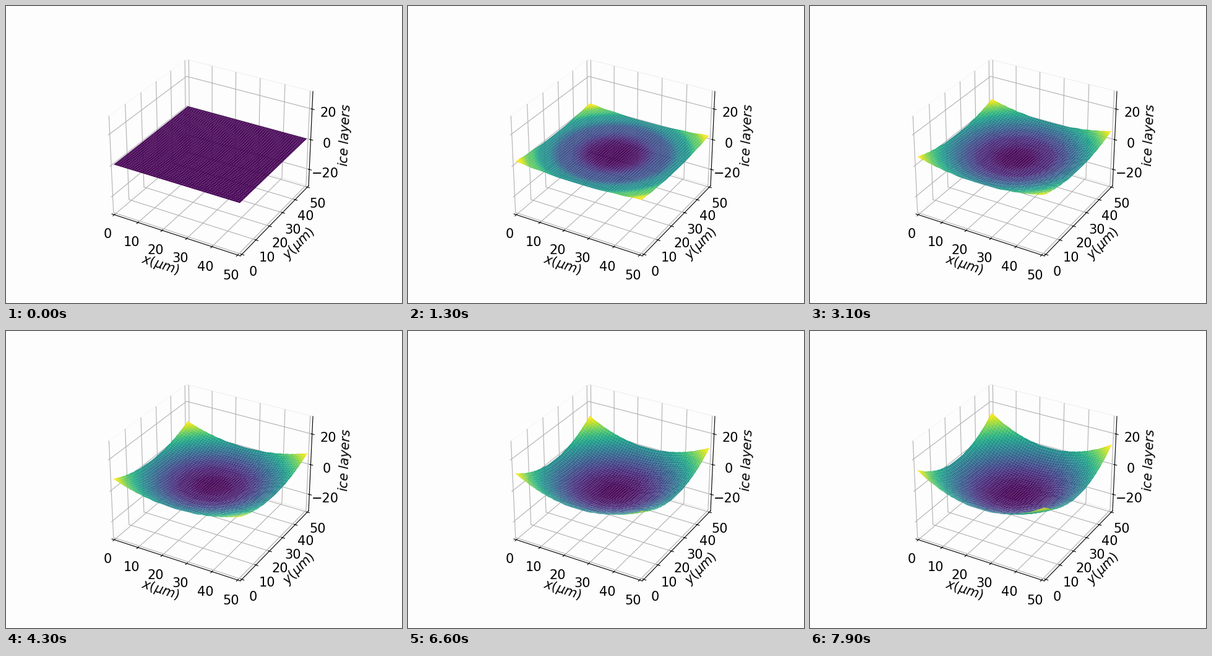
A matplotlib script for the animation above (8000 ms loop, 640 px wide and 480 px high).

```python
import numpy as np
import matplotlib.pyplot as plt
from matplotlib.animation import FuncAnimation
from mpl_toolkits.mplot3d.art3d import Poly3DCollection

FRAMES = 80
SIZE = 50
BG = "#fdfdfd"
FONT = 15

plt.rcParams["font.family"] = "DejaVu Sans"

fig = plt.figure(figsize=(6.4, 4.8), dpi=100, facecolor=BG)
ax = fig.add_subplot(projection="3d", facecolor=BG)
ax.view_init(elev=30, azim=-60)

ax.set_xticks(range(0, SIZE + 1, 10))
ax.set_yticks(range(0, SIZE + 1, 10))
ax.set_zticks([-20, 0, 20])
ax.tick_params(labelsize=FONT)

# Limits with a small margin of 1/48 on every side
pad = SIZE / 48
ax.set_xlim(-pad, SIZE + pad)
ax.set_ylim(-pad, SIZE + pad)
ax.set_zlim(-31.25, 31.25)

ax.set_xlabel(r"$x(\mu m)$", fontsize=FONT)
ax.set_ylabel(r"$y(\mu m)$", fontsize=FONT)
ax.set_zlabel(r"$ice\ layers$", fontsize=FONT)

for axis in (ax.xaxis, ax.yaxis, ax.zaxis):
    axis.pane.set_fill(False)

x, y = np.meshgrid(np.linspace(0, SIZE, 51), np.linspace(0, SIZE, 51))
half = SIZE / 2
radius = np.hypot(x - half, y - half) / np.hypot(half, half)
profile = radius ** 2.2


def height(i):
    """Bowl that deepens steadily, with softly terraced layers."""
    layers = 0.316 * i * profile
    steps = 0.143 * np.sin(2 * np.pi * (layers - 0.35)) if i else 0
    return 1 - 0.156 * i + layers + steps


def quads(z):
    p = np.stack([x, y, z], axis=-1)
    cells = np.stack([p[:-1, :-1], p[:-1, 1:], p[1:, 1:], p[1:, :-1]], axis=2)
    return cells.reshape(-1, 4, 3)


surface = Poly3DCollection(list(quads(height(0))), cmap="viridis",
                           linewidths=0, edgecolors="none")
surface.set_array(np.zeros(50 * 50))
ax.add_collection3d(surface)


def update(i):
    cells = quads(height(i))
    level = cells[:, :, 2].mean(axis=1)
    surface.set_verts(list(cells))
    surface.set_array(level)
    surface.set_clim(level.min(), level.max())
    return (surface,)


anim = FuncAnimation(fig, update, frames=FRAMES, interval=100,
                     repeat=True, repeat_delay=0, blit=False)
plt.show()
```
